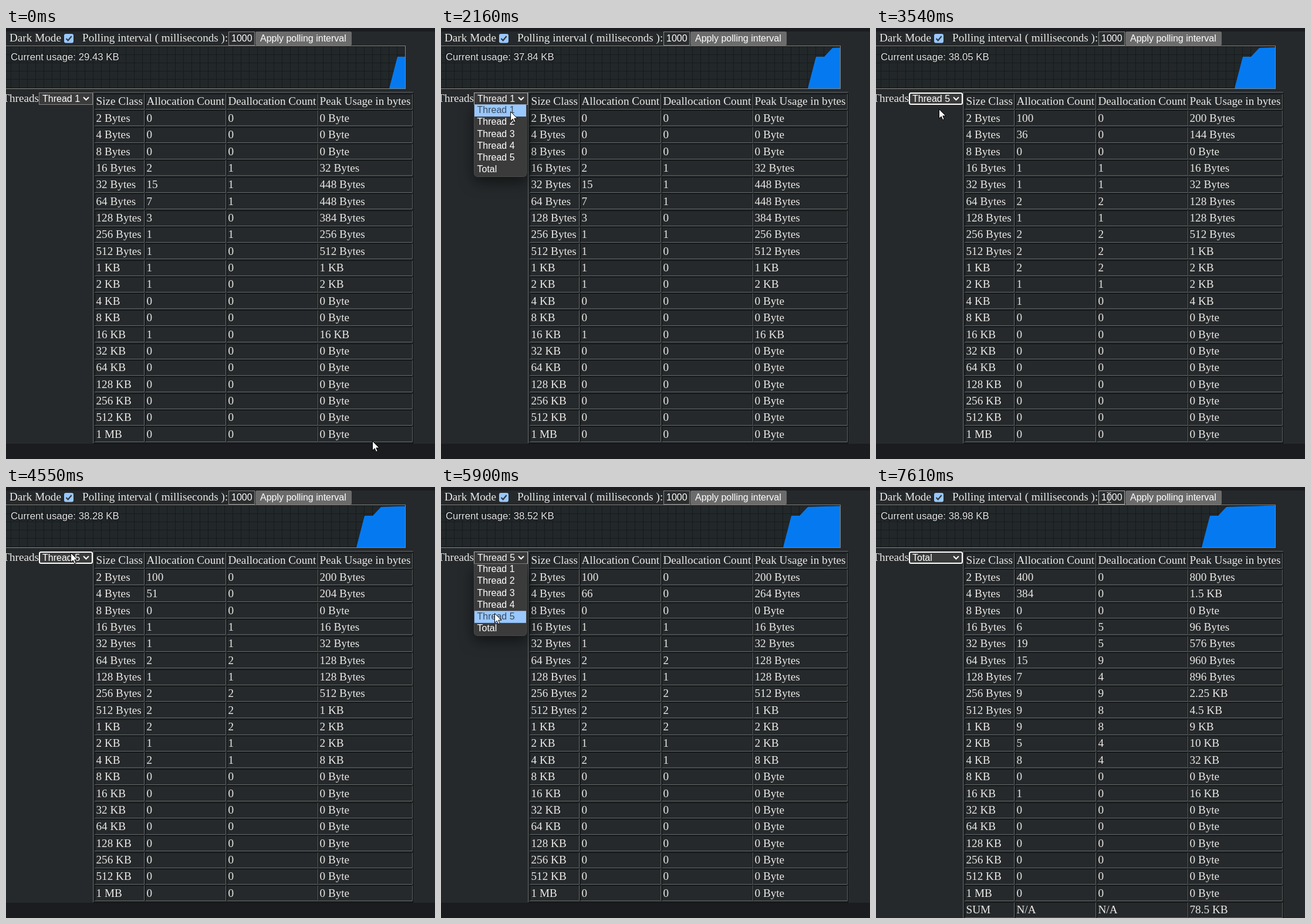
An HTML page that plays this animation: 731 by 735 pixels, repeating every 8 s.

```html
<!DOCTYPE html>
<html lang="en">
<head>
<meta charset="utf-8">
<title>Memory usage</title>
<style>
html, body { margin: 0; width: 100%; height: 100%; overflow: hidden; background: #1b1c1f; }
svg { display: block; }
text { font: 19.2px "Liberation Serif", "Times New Roman", serif; fill: #ebe9e6; white-space: pre; }
.ui { font: 16px "Liberation Sans", Arial, sans-serif; fill: #fff; }
.usage { font: 16.8px "Liberation Sans", Arial, sans-serif; fill: #e4e4e4; text-shadow: 0 0 3px #000; }
.menu { filter: drop-shadow(0 8px 12px #0008); }
.dark { fill: none; stroke: #0c0e0f; }
.light { fill: none; stroke: #5f6364; }
</style>
</head>
<body>
<svg width="731" height="735" viewBox="0 0 731 735">
  <defs>
    <pattern id="grid" x="8" y="31" width="14" height="14" patternUnits="userSpaceOnUse">
      <path d="M.5 0V14M0 .5H14" stroke="#171b1c" fill="none"/>
    </pattern>
  </defs>
  <rect id="page" y="6" width="731" height="703" fill="#25292b"/>
  <text x="6" y="23">Dark Mode</text>
  <rect x="99" y="10" width="16" height="15.5" rx="3" fill="#99c8ff"/>
  <path d="M102.500 18l3.200 3.300 6-7.300" fill="none" stroke="#34383d" stroke-width="2.200"/>
  <text x="130" y="23">Polling interval ( milliseconds ):</text>
  <rect id="input" x="379.500" y="6.500" width="44" height="23" fill="#2b2e2f" stroke="#858585"/>
  <text class="ui" x="384" y="23">1000</text>
  <rect x="425" y="6" width="164" height="24" rx="2.500" fill="#6b6b6b"/>
  <text class="ui" x="433" y="23">Apply polling interval</text>
  <rect x="-2" y="30.500" width="682.500" height="73" fill="#22272a"/>
  <rect x="-2" y="31" width="682" height="72" fill="url(#grid)"/>
  <g id="chart"></g>
  <rect x="-2" y="30.500" width="682.500" height="73" fill="none" stroke="#87837a"/>
  <text x="56" y="126" text-anchor="end">Threads</text>
  <g id="table"></g>
  <g id="select"></g>
  <g id="menu"></g>
  <g id="cursor"></g>
</svg>
<script>
const LOOP = 8000;
const polls = [400, 1830, 2820, 4210, 5220, 6600, 7610];
const usage = [29.43, 29.43, 37.58, 37.84, 38.05, 38.28, 38.52, 38.75, 38.98];
const options = ['Thread 1', 'Thread 2', 'Thread 3', 'Thread 4', 'Thread 5', 'Total'];
const menus = [[1830, 3190], [4820, 6300]];
const headers = ['Size Class', 'Allocation Count', 'Deallocation Count', 'Peak Usage in bytes'];
const left = [151, 237, 376, 532], right = [235, 374, 531, 692], textX = [153.5, 239.5, 378.5, 534.5];
const ROW = 28.37;

// Pointer path: time, x, y
const path = [
  [0, 624, 704], [69, 624, 704], [70, 115, 254], [200, 115, 254], [690, 100, 242], [1050, 100, 242],
  [1300, 142, 180], [1560, 115, 120], [2050, 115, 120], [2300, 122, 170], [2650, 117, 214],
  [2860, 117, 219], [3200, 117, 219], [3540, 107, 138], [3750, 109, 116], [4009, 109, 116],
  [4010, 109, 113], [4450, 109, 113], [4550, 110, 112], [5500, 110, 112], [5900, 91, 215],
  [6100, 95, 237], [6300, 95, 237], [7060, 400, 51], [7130, 398, 24], [7340, 397, 18], [LOOP, 397, 18]
];

const cache = {};
function put(id, html) {
  if (cache[id] !== html) document.getElementById(id).innerHTML = cache[id] = html;
}
const label = (x, y, s, cls = '') => `<text class="${cls}" x="${x}" y="${y}">${s}</text>`;

function pointer(t) {
  const i = path.findIndex(p => p[0] > t), [a, ax, ay] = path[i - 1], [b, bx, by] = path[i];
  const k = (t - a) / (b - a);
  return [ax + (bx - ax) * k, ay + (by - ay) * k];
}

function bytes(n) {
  if (n < 1024) return n + (n ? ' Bytes' : ' Byte');
  return n < 1 << 20 ? +(n / 1024).toFixed(2) + ' KB' : n / (1 << 20) + ' MB';
}

function chart(n) {
  const x = i => 681 - 14 * (n + 1 - i);
  const top = usage.slice(0, n + 2).map((v, i) => `${x(i)},${(103.5 - v * 1.85).toFixed(1)}`);
  put('chart', `<polygon points="${x(-1)},103 ${top.join(' ')} 681,103" fill="#057af0"/>` +
    label(8, 55, `Current usage: ${usage[n + 1].toFixed(2)} KB`, 'usage'));
}

// Counts per size class, from 2 bytes up to 1 MB
function counts(choice, n) {
  const extra = n >= 4 ? 1 : 0;
  const first = { alloc: [0, 0, 0, 2, 15, 7, 3, 1, 1, 1, 1, 0, 0, 1], free: [0, 0, 0, 1, 1, 1, 0, 1] };
  const worker = {
    alloc: [100, 36 + 15 * (n - 3), 0, 1, 1, 2, 1, 2, 2, 2, 1, 1 + extra],
    free: [0, 0, 0, 1, 1, 2, 1, 2, 2, 2, 1, extra]
  };
  const a = choice === 4 ? 0 : 1, b = [0, 0, 0, 0, 1, 4][choice];
  const mix = key => Array.from({ length: 20 }, (_, i) => a * (first[key][i] || 0) + b * (worker[key][i] || 0));
  const alloc = mix('alloc');
  return { alloc, free: mix('free'), peak: alloc.map((c, i) => (c - (a && i === 4 ? 1 : 0)) * 2 ** (i + 1)) };
}

function table(choice, n) {
  const { alloc, free, peak } = counts(choice, n);
  const rows = [headers, ...alloc.map((c, i) => [bytes(2 ** (i + 1)), c, free[i], bytes(peak[i])])];
  if (choice === 5) rows.push(['SUM', 'N/A', 'N/A', bytes(peak.reduce((s, v) => s + v))]);
  const end = Math.round(112.5 + ROW * rows.length);
  let dark = `M149 ${end}.5H693.5V109`, light = `M148.500 ${end}V109.500H694`, texts = '';
  rows.forEach((row, r) => {
    const y = Math.round(112 + ROW * r) + .5;
    row.forEach((s, c) => {
      const l = left[c] + .5, e = right[c] + .5;
      dark += `M${l} ${y + 26}V${y}H${e}`;
      light += `M${l} ${y + 26}H${e}V${y}`;
      texts += label(textX[c], Math.round(131.4 + ROW * r), s);
    });
  });
  put('table', `<path class="dark" d="${dark}"/><path class="light" d="${light}"/>${texts}`);
  document.getElementById('page').setAttribute('height', choice === 5 ? 729 : 703);
}

function select(choice, open, focused, hover) {
  const box = focused && !open
    ? '<rect x="57" y="111" width="90" height="19" rx="2.500" fill="#3b3b3b" stroke="#fff" stroke-width="2"/>'
    : `<rect x="56.500" y="110.500" width="91" height="20" fill="#3b3b3b" stroke="${hover || open ? '#b0b0b0' : '#858585'}"/>`;
  put('select', box + label(62, 126, options[choice], 'ui') +
    '<path d="M132 118l4.500 4.500 4.500-4.500" fill="none" stroke="#fff" stroke-width="2"/>');
}

function menu(alpha, active) {
  if (alpha <= 0) return put('menu', '');
  const items = options.map((s, i) => {
    const on = i === active, y = 130.5 + 20.2 * i;
    return (on ? `<rect x="57" y="${y}" width="88" height="20.500" fill="#99c8ff"/>` : '') +
      `<text class="ui" x="61.500" y="${Math.round(y + 14.6)}"${on ? ' style="fill:#3b4a5c"' : ''}>${s}</text>`;
  });
  put('menu', `<g class="menu" opacity="${alpha.toFixed(2)}">
    <path d="M56.500 131H146V247q0 6.500-6.500 6.500H63q-6.500 0-6.500-6.500z" fill="#3b3b3b" stroke="#4a4a4a"/>${items.join('')}</g>`);
}

function cursor(x, y, beam) {
  put('cursor', `<g transform="translate(${x.toFixed(1)} ${y.toFixed(1)})">` + (beam
    ? '<path d="M-3.500-8.500h2.500l1 1 1-1h2.500M0-7.500V7.500M-3.500 8.500h2.500l1-1 1 1h2.500" fill="none" stroke="#d8d8d8"/>'
    : '<path d="M.5.5V16.500L4.200 13 6.700 18.700 9.200 17.600 6.800 12H12z" fill="#fff" stroke="#000"/>') + '</g>');
}

function frame(now) {
  const t = now % LOOP;
  const n = polls.filter(p => p <= t).length;
  const [x, y] = pointer(t);
  const choice = t < 3190 ? 0 : t < 6300 ? 4 : 5;
  const open = menus.some(([a, b]) => t >= a && t < b);
  const alpha = Math.max(...menus.map(([a, b]) => Math.min(1, (t - a + 60) / 180, t < b ? 1 : 1 - (t - b + 60) / 130)));
  const beam = x > 379 && x < 424 && y < 30;
  const overMenu = y > 131 && y < 253 && x < 146;
  chart(n);
  table(choice, n);
  select(choice, open, t >= 3190, x > 56 && x < 148 && y > 110 && y < 131);
  menu(open || t >= 3190 ? alpha : 0, overMenu ? Math.floor((y - 130.5) / 20.2) : choice);
  cursor(x, y, beam);
  document.getElementById('input').setAttribute('stroke', beam ? '#b0b0b0' : '#858585');
  requestAnimationFrame(() => frame(performance.now()));
}
frame(performance.now());
</script>
</body>
</html>
```
